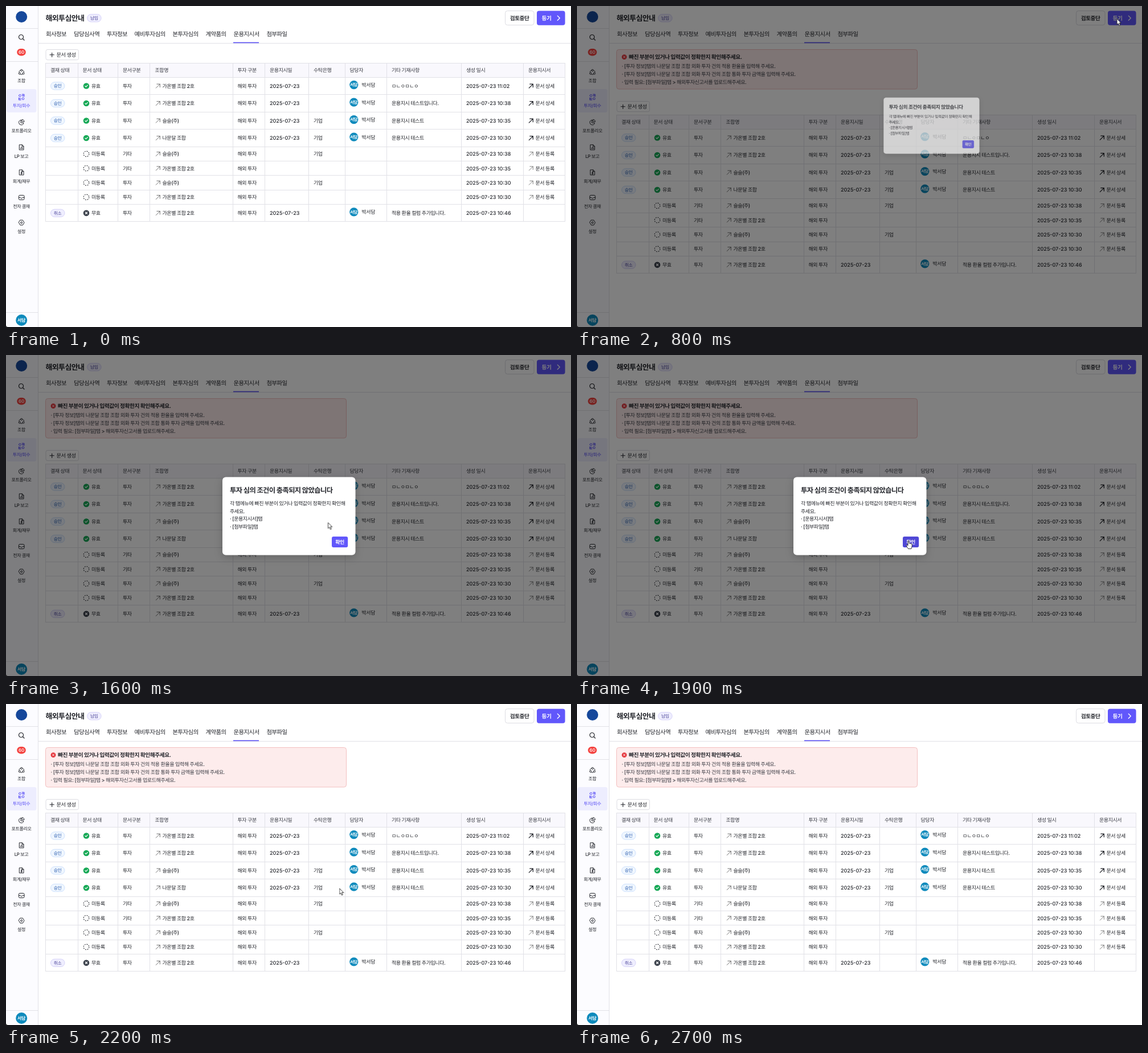
Write an HTML page that moves like this. It is 992 px wide and 564 px high and loops after 3.2 s.

```html
<!DOCTYPE html>
<html lang="ko">
<head>
<meta charset="utf-8">
<title>운용지시서</title>
<style>
html, body { margin: 0; width: 100%; height: 100%; overflow: hidden; background: #fff; }
svg { display: block; width: 992px; height: 564px; }
text {
  font-family: Inter, "Noto Sans CJK KR", "Noto Sans CJK", sans-serif;
  font-weight: 500; letter-spacing: -.05em; text-rendering: geometricPrecision; white-space: pre;
}
text.b { font-weight: 700; }
text.n { letter-spacing: 0; }
.ln { stroke: #e1e1e7; fill: none; shape-rendering: crispEdges; }
.ic { fill: none; stroke-linecap: round; stroke-linejoin: round; }

.anim { animation: 3.2s step-end infinite; }
#table { animation-name: push; }
#alert { animation-name: appear; }
#mask { animation-name: dim; }
#modal { animation-name: zoom; transform-origin: 945.5px 23px; }
#cursor { animation-name: move; }
#hand { animation-name: hand; }
#arrow { animation-name: arrow; }
#next { animation-name: next; }
#ok { animation-name: ok; }

@keyframes push { 0% { transform: none } 25%, 100% { transform: translateY(91px) } }
@keyframes appear { 0% { opacity: 0 } 25%, 100% { opacity: 1 } }
@keyframes dim { 0% { opacity: 0 } 25% { opacity: .5 } 68.75%, 100% { opacity: 0 } }
@keyframes zoom {
  0% { opacity: 0; transform: scale(.2) }
  25% { opacity: .65; transform: scale(.72) }
  28.125% { opacity: .95; transform: scale(.96) }
  31.25% { opacity: 1; transform: none }
  62.5% { opacity: .96; transform: scale(.97) }
  65.625% { opacity: .24; transform: scale(.39) }
  68.75%, 100% { opacity: 0; transform: scale(.2) }
}
@keyframes move {
  0%, 6.25% { transform: translate(957px, 27px) }
  9.375% { transform: translate(950px, 24px) }
  12.5% { transform: translate(948px, 23px) }
  25% { transform: translate(948px, 22.5px) }
  28.125% { transform: translate(946px, 24px) }
  31.25% { transform: translate(940px, 30px) }
  34.375% { transform: translate(905px, 60px) }
  37.5% { transform: translate(830px, 130px) }
  40.625% { transform: translate(752px, 198px) }
  43.75% { transform: translate(660px, 244px) }
  46.875% { transform: translate(585px, 282px) }
  50% { transform: translate(565.5px, 294.5px) }
  53.125% { transform: translate(564px, 298px) }
  56.25% { transform: translate(572px, 315px) }
  59.375% { transform: translate(582px, 326px) }
  65.625% { transform: translate(582.5px, 326.5px) }
  68.75% { transform: translate(585.5px, 324px) }
  71.875% { transform: translate(615px, 300px) }
  75% { transform: translate(735px, 215px) }
  78.125% { transform: translate(884px, 106px) }
  81.25%, 100% { transform: translate(957px, 26px) }
}
@keyframes hand {
  0% { opacity: 0 } 6.25% { opacity: 1 } 25% { opacity: 0 }
  59.375% { opacity: 1 } 65.625% { opacity: 0 }
  81.25% { opacity: 1 } 84.375%, 100% { opacity: 0 }
}
@keyframes arrow {
  0% { opacity: 0 } 25% { opacity: 1 } 59.375% { opacity: 0 }
  65.625% { opacity: 1 } 81.25%, 100% { opacity: 0 }
}
@keyframes next {
  0% { fill: #6157fb } 6.25% { fill: #584fe8 } 9.375% { fill: #5048d6 } 25% { fill: #6157fb }
  81.25% { fill: #5048d6 } 84.375%, 100% { fill: #6157fb }
}
@keyframes ok { 0% { fill: #6157fb } 59.375% { fill: #5048d6 } 65.625%, 100% { fill: #6157fb } }
</style>
</head>
<body>
<svg id="stage" viewBox="0 0 992 564"></svg>
<script>
const INK = '#24262c', PURPLE = '#5b50f5', BLUE = '#0d8abc';

// y is the vertical centre of the text
const text = (x, y, str, size = 9, fill = INK, cls = '', anchor = 'start') =>
  `<text x="${x}" y="${(y + size * .37).toFixed(2)}" font-size="${size}" fill="${fill}" class="${cls}" text-anchor="${anchor}">${str}</text>`;
const rect = (x, y, w, h, r, fill, stroke = 'none', more = '') =>
  `<rect x="${x}" y="${y}" width="${w}" height="${h}" rx="${r}" fill="${fill}" stroke="${stroke}" ${more}/>`;
const circle = (x, y, r, fill, more = '') => `<circle cx="${x}" cy="${y}" r="${r}" fill="${fill}" ${more}/>`;
const line = d => `<path class="ln" d="${d}"/>`;
const icon = (x, y, d, stroke = INK, w = 1) =>
  `<path class="ic" transform="translate(${x} ${y})" d="${d}" stroke="${stroke}" stroke-width="${w}"/>`;
const ring = (x, y, r) => `M${x - r} ${y}a${r} ${r} 0 1 0 ${2 * r} 0a${r} ${r} 0 1 0 ${-2 * r} 0`;
const CROSS = 'M-1.6-1.6L1.6 1.6M1.6-1.6L-1.6 1.6';
const avatar = (x, y, r, size) => circle(x, y, r, BLUE) + text(x - .2, y, '서담', size, '#fff', 'b', 'middle');
const linkArrow = (x, y, color, w) => icon(x, y, 'M-3.5 3.5L3.5-3.5M-2-3.5H3.5V2', color, w);

function pill(x, y, str, violet) {
  const [bg, edge, ink] = violet ? ['#efeefe', '#cdc8f7', '#4c4599'] : ['#eff6ff', '#c4dbfb', '#2458ab'];
  return rect(x, y - 6.7, 24.5, 13.4, 6.7, bg, edge, 'stroke-width=".8"') +
    text(x + 12.1, y, str, 7.8, ink, '', 'middle');
}

function sidebar() {
  const doc = 'M-3.5-4.5H1L3.8-1.8V4.5H-3.5ZM1-4.5V-1.8H3.8';
  const items = [
    ['조합', ring(0, -3, 1.6) + ring(-3.3, 2.5, 1.6) + ring(3.3, 2.5, 1.6) +
      'M-2.5-3A4.6 4.6 0 0 0-4.4.2M2.5-3A4.6 4.6 0 0 1 4.4.2M-1.5 4.2A4.6 4.6 0 0 0 1.5 4.2'],
    ['투자/회수', ring(-2.7, -2.7, 1.9) + ring(2.7, 2.7, 1.9) + ring(2.7, -2.7, 1.2) + ring(-2.7, 2.7, 1.2) +
      'M1-5H4.8V-1M-1 5H-4.8V1'],
    ['포트폴리오', 'M-1-3.8A4.3 4.3 0 1 0 3.8 1.5L-1 .8ZM1.2-4.8A4 4 0 0 1 4.8-.8L1.2-1.2Z'],
    ['LP 보고', doc + 'M-1.6 2.5V1M.2 2.5V-.8M2 2.5V.5'],
    ['회계/재무', doc + 'M1.5-.6H-.5Q-1.5.5 0 .9Q1.8 1.4.8 2.5H-1.3M.1-1.4V3.3'],
    ['전자 결재', 'M-4.8-2.2Q-4.8-4-3-4H3Q4.8-4 4.8-2.2V2.2Q4.8 4 3 4H-3Q-4.8 4-4.8 2.2ZM-4.8 0H-2Q-1.5 1.5 0 1.5T2 0H4.8'],
    ['설정', 'M-2.2-4.4H2.2L4.8 0L2.2 4.4H-2.2L-4.8 0Z' + ring(0, 0, 1.6)],
  ];
  return rect(0, 0, 56, 564, 0, '#fcfcff') +
    line('M56.5 0V564M0 39.5H56M0 97.5H56M0 538.5H56') +
    circle(27.2, 19, 10, '#16489b') +
    icon(27, 55, ring(-.5, -.5, 4) + 'M2.5 2.5L5 5', INK, 1.2) +
    rect(19.3, 75, 15.4, 12.4, 6.2, '#f4423f') + text(27, 81.2, '60', 8, '#fff', 'n', 'middle') +
    rect(1, 146, 52.5, 41, 4, '#ededfe') +
    items.map(([label, d], i) => {
      const y = 116 + 44.1 * i, color = i === 1 ? PURPLE : INK;
      return icon(27.2, y, d, color) + text(27, y + 15.3, label, 8, color, '', 'middle');
    }).join('') +
    avatar(27.2, 552, 10, 8) +
    '<path d="M0 561.5V564H2.5Z" fill="#555"/>';
}

function header() {
  const tabs = [[70, '회사정보'], [119, '담당심사역'], [177, '투자정보'], [225.5, '예비투자심의'],
    [292.5, '본투자심의'], [350.5, '계약품의'], [399.5, '운용지시서'], [457.5, '첨부파일']];
  return text(69.5, 21.2, '해외투심안내', 13, INK, 'b') + pill(142.6, 21.2, '납입', true) +
    tabs.map(([x, s]) => text(x, 49, s, 10.4)).join('') +
    line('M57 65.5H992') + rect(399, 63.6, 45, 1.6, 0, PURPLE) +
    rect(876.5, 8.5, 50.5, 25, 4, '#fff', '#dcdce2') + text(901.6, 21, '검토중단', 9.7, INK, 'b', 'middle') +
    rect(932, 8.5, 49.6, 25.2, 4, '#6157fb', 'none', 'id="next" class="anim"') +
    text(949, 21, '등기', 9.7, '#fff', 'b', 'middle') + icon(970.3, 21.3, 'M-2-4L2 0L-2 4', '#fff', 1.3);
}

function table() {
  const cols = [69.5, 126.5, 196.5, 252.5, 398.5, 454.5, 531.5, 595.5, 668.5, 799.5, 908.5, 981.5];
  const textX = [78, 134.5, 205, 261.5, 406.5, 463, 540, 603.5, 677, 808, 917];
  const heads = ['결재 상태', '문서 상태', '문서구분', '조합명', '투자 구분', '운용지시일', '수탁은행',
    '담당자', '기타 기재사항', '생성 일시', '운용지시서'];
  const A = '가온별 조합 2호', B = '슬슬(주)', C = '나문달 조합';
  // status, kind, fund, bank, memo, time
  const rows = [
    ['유효', '투자', A, '', 'ㅁㄴㅇㅁㄴㅇ', '11:02'],
    ['유효', '투자', A, '', '운용지시 테스트입니다.', '10:38'],
    ['유효', '투자', B, '기업', '운용지시 테스트', '10:35'],
    ['유효', '투자', C, '기업', '운용지시 테스트', '10:30'],
    ['미등록', '기타', B, '기업', '', '10:38'],
    ['미등록', '기타', A, '', '', '10:35'],
    ['미등록', '투자', B, '기업', '', '10:30'],
    ['미등록', '투자', A, '', '', '10:30'],
    ['무효', '투자', A, '', '적용 환율 컬럼 추가입니다.', '10:46'],
  ];
  const marks = {
    유효: y => circle(141, y, 5.3, '#18a957') + icon(141, y, 'M-2.2.1L-.6 1.7L2.3-1.4', '#fff', 1.2),
    미등록: y => circle(141, y, 4.8, 'none', `stroke="${INK}" stroke-width="1.1" stroke-dasharray="1.9 1.87"`),
    무효: y => circle(141, y, 5.3, '#3d434d') + icon(141, y, CROSS, '#fff', 1.2),
  };
  let out = rect(70, 76.5, 57.5, 18.2, 3, '#fff', '#dcdce2') +
    icon(80.7, 85.8, 'M-3.6 0H3.6M0-3.6V3.6', INK, 1.1) + text(88.5, 85.6, '문서 생성', 9.2) +
    rect(69.5, 100, 912, 25.5, 0, '#f9f8fd') +
    heads.map((h, i) => text(textX[i], 112.7, h, 9, '#3a3c44')).join('');
  let top = 125, lines = 'M69.5 100.5H982M69.5 125.5H982';
  for (const [status, kind, fund, bank, memo, time] of rows) {
    const filed = status !== '미등록', valid = status === '유효';
    const h = filed ? 30.5 : 25.35, y = top + h / 2 + .2;
    if (filed) {
      out += pill(78.5, y, valid ? '승인' : '취소', !valid) + text(463, y, '2025-07-23', 9, INK, 'n') +
        avatar(610.8, y - 1.9, 7.6, 7.6) + text(624.5, y - 1.7, '박서담');
    }
    out += marks[status](y) + text(150, y, status) + text(205, y, kind) +
      linkArrow(266.8, y + .2, '#666', .9) + text(274.5, y, fund) + text(406.5, y, '해외 투자') +
      text(540, y, bank) + text(677, y, memo) + text(808, y, '2025-07-23 ' + time, 9, INK, 'n');
    if (status !== '무효') {
      out += linkArrow(921.8, y + .2, valid ? INK : '#777', valid ? 1.3 : .9) +
        text(929.5, y, valid ? '문서 상세' : '문서 등록');
    }
    top += h;
    lines += `M69.5 ${Math.floor(top) + .5}H982`;
  }
  return out + line(lines + cols.map(x => `M${x} 100V379`).join(''));
}

function alertBox() {
  const notes = ['· [투자 정보]탭의 나문달 조합 조합 외화 투자 건의 적용 환율을 입력해 주세요.',
    '· [투자 정보]탭의 나문달 조합 조합 외화 투자 건의 조합 통화 투자 금액을 입력해 주세요.',
    '· 입력 필요: [첨부파일]탭 &gt; 해외투자신고서를 업로드해주세요.'];
  return rect(69.5, 76.5, 528, 69.5, 4, '#fdecec', '#f3bfbf') +
    circle(83, 89.6, 4.4, '#e5353b') + icon(83, 89.6, CROSS, '#fff', 1) +
    text(91, 89, '빠진 부분이 있거나 입력값이 정확한지 확인해주세요.', 9.75, INK, 'b') +
    notes.map((s, i) => text(78.5, 106 + 13.7 * i, s, 9.05, '#3a3c44')).join('');
}

function modal() {
  const body = ['각 탭메뉴에 빠진 부분이 있거나 입력값이 정확한지 확인해', '주세요.', '· [운용지시서]탭', '· [첨부파일]탭'];
  return rect(380, 214.5, 233.5, 137, 6, '#fff', 'none', 'filter="url(#shadow)"') +
    text(393, 237.2, '투자 심의 조건이 충족되지 않았습니다', 12.3, INK, 'b') +
    body.map((s, i) => text(393, 260.6 + 13.7 * i, s, 9.05)).join('') +
    rect(572, 319, 28.2, 19, 3, '#6157fb', 'none', 'id="ok" class="anim"') +
    text(586, 328.4, '확인', 9, '#fff', 'b', 'middle');
}

const cursor = `<g fill="#fff" stroke="#222" stroke-width=".9" stroke-linejoin="round">
  <path id="arrow" class="anim" d="M0 0V10.2L2.3 8.1L4 12L5.8 11.2L4.1 7.4H7.2Z"/>
  <path id="hand" class="anim" d="M-1 1Q0-.6 1 1V5Q2.2 4.2 3 5.4Q4.2 4.7 4.8 5.9Q6.2 5.6 6.2 7.2V10Q5.8 12 5 14.5H-.6Q-1.2 12.6-3 10.4Q-4.4 8.4-3.2 7.8Q-2.2 7.5-1 9Z"/>
</g>`;

const group = (id, content) => `<g id="${id}" class="anim">${content}</g>`;

document.getElementById('stage').innerHTML =
  `<defs><filter id="shadow" x="-20%" y="-20%" width="140%" height="150%">
    <feDropShadow dx="0" dy="4" stdDeviation="7" flood-opacity=".2"/></filter></defs>` +
  rect(0, 0, 992, 564, 0, '#fff') + sidebar() + header() +
  group('table', table()) + group('alert', alertBox()) +
  rect(0, 0, 992, 564, 0, '#000', 'none', 'id="mask" class="anim"') +
  group('modal', modal()) + group('cursor', cursor);
</script>
</body>
</html>
```
